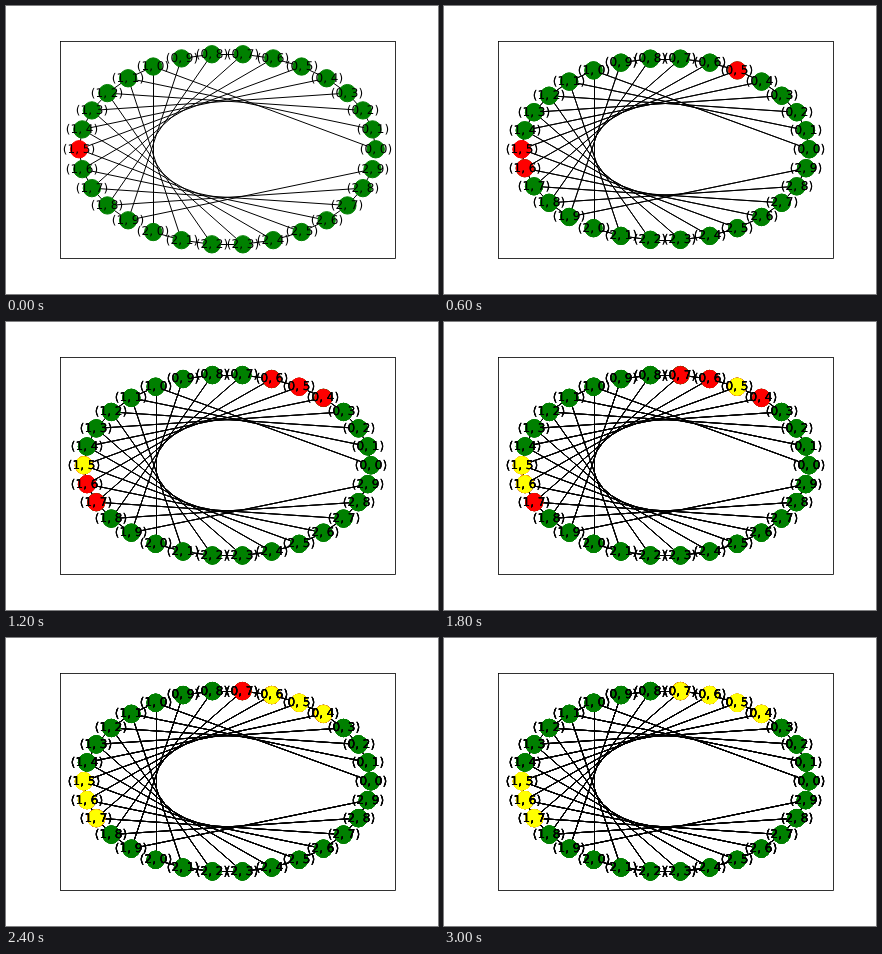
Write an HTML page with a canvas that moves like this. It is 432 by 288 pixels and loops after 3600 ms.

```html
<!DOCTYPE html>
<html lang="en">
<head>
<meta charset="utf-8">
<title>Spread on a circular grid graph</title>
<style>
  html, body { margin: 0; width: 432px; height: 288px; overflow: hidden; background: #fff; }
  canvas { display: block; }
</style>
</head>
<body>
<canvas id="stage" width="432" height="288"></canvas>
<script>
const ctx = document.getElementById('stage').getContext('2d');

const STEP = 600, STEPS = 6;
const COLS = 10, COUNT = 30;
const BOX = { x: 54, y: 34.56, w: 334.8, h: 217.44 };
const CX = BOX.x + BOX.w / 2, CY = BOX.y + BOX.h / 2;
const SIZE = Math.sqrt(300);

// Node index -> step at which it turns red; it turns yellow two steps later.
const hitAt = { 15: 0, 5: 1, 16: 1, 4: 2, 6: 2, 17: 2, 7: 3 };

const angle = i => 2 * Math.PI * i / COUNT;
const label = i => `(${Math.floor(i / COLS)}, ${i % COLS})`;
const snap = v => Math.floor(v + 0.5) + 0.5;

const edges = [];
for (let i = 0; i < COUNT; i++) {
  if (i % COLS < COLS - 1) edges.push([i, i + 1]);
  if (i + COLS < COUNT) edges.push([i, i + COLS]);
}

function color(i, step) {
  const age = step - hitAt[i];
  return age >= 2 ? '#ff0000'.replace('#ff00', '#ffff') : age >= 0 ? '#ff0000' : '#008000';
}

// Each redraw refits the axes around the markers at the previous scale.
function fit(length, span, step) {
  let scale = length;
  for (let p = 0; p <= step; p++) scale = length / (1.1 * (span + SIZE / scale));
  return scale;
}

function layout(step) {
  const rx = fit(BOX.w, 2, step);
  const ry = fit(BOX.h, 2 * Math.sin(angle(7)), step);
  return Array.from({ length: COUNT }, (_, i) => ({
    x: CX + rx * Math.cos(angle(i)),
    y: CY - ry * Math.sin(angle(i))
  }));
}

function drawEdge(a, b) {
  const upright = Math.abs(a.x - b.x) < 0.01, level = Math.abs(a.y - b.y) < 0.01;
  const px = p => upright ? snap(p.x) : p.x;
  const py = p => level ? snap(p.y) : p.y;
  ctx.beginPath();
  ctx.moveTo(px(a), py(a));
  ctx.lineTo(px(b), py(b));
  ctx.stroke();
}

function drawNode({ x, y }, fill) {
  ctx.fillStyle = ctx.strokeStyle = fill;
  ctx.beginPath();
  ctx.arc(x, y, SIZE / 2, 0, 2 * Math.PI);
  ctx.fill();
  ctx.stroke();
}

function drawFrame() {
  const x = snap(BOX.x), y = snap(BOX.y);
  ctx.strokeStyle = '#000';
  ctx.lineWidth = 0.8;
  ctx.strokeRect(x, y, snap(BOX.x + BOX.w) - x, snap(BOX.y + BOX.h) - y);
}

// Every step paints another pass over the earlier ones, layer by layer.
function draw(step) {
  const nodes = layout(step);
  const passes = fn => { for (let p = 0; p <= step; p++) fn(p); };

  ctx.fillStyle = '#fff';
  ctx.fillRect(0, 0, 432, 288);

  ctx.strokeStyle = '#000';
  ctx.lineWidth = 1;
  passes(() => edges.forEach(([a, b]) => drawEdge(nodes[a], nodes[b])));
  passes(p => nodes.forEach((n, i) => drawNode(n, color(i, p))));
  drawFrame();

  ctx.fillStyle = '#000';
  ctx.font = '12px "DejaVu Sans", sans-serif';
  ctx.textAlign = 'center';
  ctx.textBaseline = 'alphabetic';
  ctx.textRendering = 'geometricPrecision';
  passes(() => nodes.forEach((n, i) =>
    ctx.fillText(label(i), Math.round(n.x), Math.round(n.y + 3.4))));
}

let shown = -1;
const start = performance.now();

function tick() {
  const step = Math.floor((performance.now() - start) / STEP) % STEPS;
  if (step !== shown) draw(shown = step);
  requestAnimationFrame(tick);
}
tick();
</script>
</body>
</html>
```
